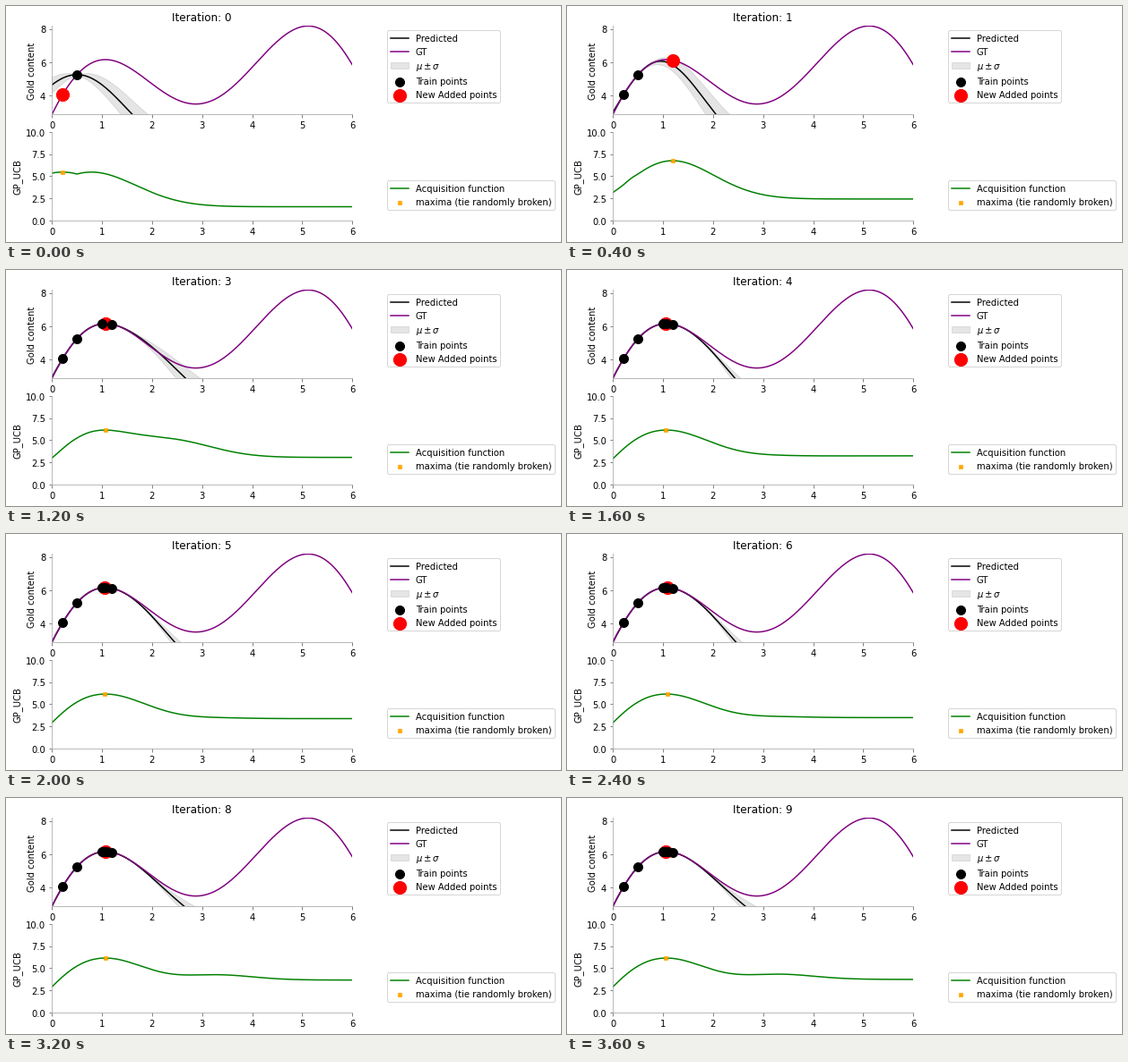
A matplotlib script that plays this animation: 619x264 px, repeating every 4000 ms.

```python
import numpy as np
import matplotlib.pyplot as plt
from matplotlib.animation import FuncAnimation
from matplotlib.text import Text
from matplotlib.transforms import Affine2D

W, H, DPI = 619, 264, 72
STEPS, INTERVAL = 10, 400

plt.rcParams.update({
    "font.family": "DejaVu Sans",
    "font.size": 10,
    "axes.titlesize": 12,
    "axes.edgecolor": "#aaaaaa",
    "xtick.color": "#666666",
    "ytick.color": "#666666",
    "xtick.labelcolor": "black",
    "ytick.labelcolor": "black",
    "axes.spines.top": False,
    "axes.spines.right": False,
})


def gold(x):
    return 2 * (x - 3) * np.sin(x - 3) + x / 2 + 2


def rbf(a, b):
    return np.exp(-0.5 * (a[:, None] - b[None, :]) ** 2)


def posterior(xs, x):
    """Mean and deviation of a zero-mean, unit-scale Gaussian process."""
    chol = np.linalg.cholesky(rbf(xs, xs) + 1e-10 * np.eye(len(xs)))
    v = np.linalg.solve(chol, rbf(xs, x))
    mu = v.T @ np.linalg.solve(chol, gold(xs))
    return mu, np.sqrt(np.clip(1 - (v ** 2).sum(axis=0), 0, None))


def explore(t):
    """Exploration weight of GP-UCB, growing with the iteration."""
    return np.sqrt(2 * np.log((t + 1) ** 2.5 * np.pi ** 2 / 3))


# First sample, then the point queried at each iteration
queries = np.array([0.5, 0.21, 1.2, 1.0, 1.07, 1.06, 1.06, 1.09, 1.09, 1.07, 1.05])
x = np.linspace(0, 6, 601)
truth = gold(x)

fig = plt.figure(figsize=((W + 1e-6) / DPI, (H + 1e-6) / DPI), dpi=DPI, facecolor="white")


def add_axes(bottom, ylim, yticks, ylabel):
    ax = fig.add_axes([51.3 / W, bottom / H, 334.8 / W, 98.84 / H])
    ax.set(xlim=(0, 6), ylim=ylim, xticks=range(7), yticks=yticks, ylabel=ylabel)
    return ax


def add_legend(ax, handles, top):
    ax.legend(handles=handles, loc="upper left", borderaxespad=0,
              bbox_to_anchor=(424.7 / W, 1 - top / H),
              bbox_transform=fig.transFigure)


top = add_axes(142.8, (truth.min(), truth.max()), [4, 6, 8], "Gold content")
low = add_axes(24.2, (0, 10), np.arange(0, 10.1, 2.5), "GP_UCB")
title = top.set_title("Iteration: 0")

mean_line, = top.plot(x, truth, color="black", label="Predicted")
truth_line, = top.plot(x, truth, color="purple", label="GT")
band = top.fill_between(x, truth, truth, color="grey", alpha=0.2,
                        label=r"$\mu \pm \sigma$")
train = top.scatter([0.5], [5], s=100, color="black", zorder=10, label="Train points")
added = top.scatter([0.5], [5], s=200, color="red", zorder=5, label="New Added points")
acq_line, = low.plot(x, truth, color="green", label="Acquisition function")
best = low.scatter([0.5], [5], s=20, marker="X", color="orange", zorder=5,
                   label="maxima (tie randomly broken)")

add_legend(top, [mean_line, truth_line, band, train, added], 27.3)
add_legend(low, [acq_line, best], 195.3)

# All text sits slightly lower than the default layout puts it
drop = Affine2D().translate(0, -0.8)
for text in fig.findobj(Text):
    text.set_transform(text.get_transform() + drop)


def update(t):
    seen, new = queries[:t + 1], queries[t + 1]
    mu, sigma = posterior(seen, x)
    acq = mu + explore(t) * sigma

    title.set_text(f"Iteration: {t}")
    mean_line.set_ydata(mu)
    acq_line.set_ydata(acq)
    band.set_verts([np.column_stack([np.r_[x, x[::-1]],
                                     np.r_[mu - sigma, (mu + sigma)[::-1]]])])
    train.set_offsets(np.column_stack([seen, gold(seen)]))
    added.set_offsets([[new, gold(new)]])
    best.set_offsets([[new, np.interp(new, x, acq)]])
    return title, mean_line, acq_line, band, train, added, best


anim = FuncAnimation(fig, update, frames=STEPS, interval=INTERVAL,
                     repeat=True, repeat_delay=0, blit=False)
plt.show()
```
